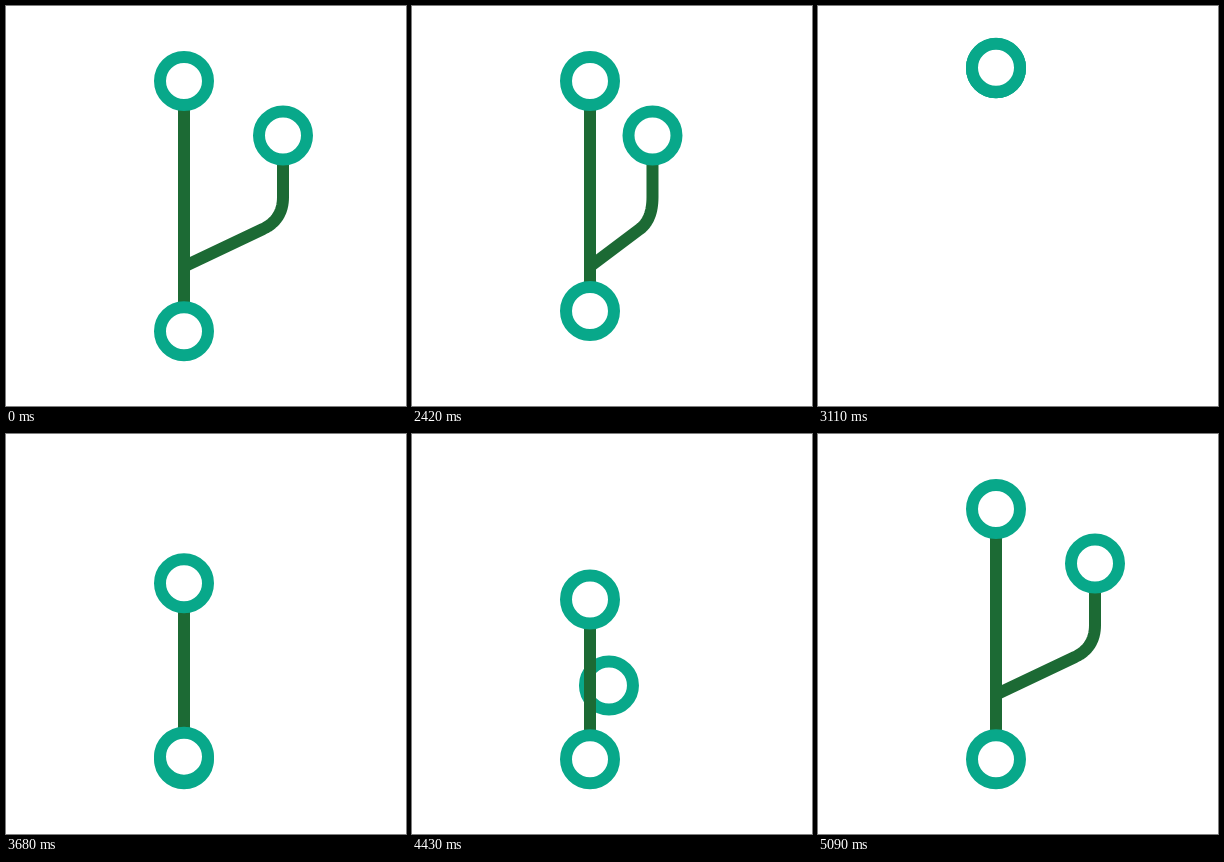
An HTML page with a canvas for the animation above (5120 ms loop, 400x400 px).

```html
<!DOCTYPE html>
<html lang="en">
<head>
<meta charset="utf-8">
<title>Fork</title>
<style>
html, body { margin: 0; width: 100%; height: 100%; overflow: hidden; background: #fff; }
canvas { display: block; width: 400px; height: 400px; }
</style>
</head>
<body>
<canvas id="stage" width="400" height="400"></canvas>
<script>
const ctx = document.getElementById('stage').getContext('2d');
const LOOP = 5120;
const RING = '#08a88a', LINE = '#1c6a34';
const X = 178, TOP = 75, BOTTOM = 325.3, PEAK = 57;
const SIDE = { x: 277, y: 129.5 };

const clamp = v => Math.max(0, Math.min(1, v));
const mix = (a, b, p) => a + (b - a) * p;
const span = (t, start, length) => clamp((t - start) / length);
const cubic = p => p < 0.5 ? 4 * p ** 3 : 1 - 4 * (1 - p) ** 3;

// cubic-bezier(.4, 0, .2, 1)
function swift(x) {
  let lo = 0, hi = 1;
  for (let i = 0; i < 24; i++) {
    const s = (lo + hi) / 2, r = 1 - s;
    if (1.2 * r * r * s + 0.6 * r * s * s + s ** 3 < x) lo = s; else hi = s;
  }
  return lo * lo * (3 - 2 * lo);
}

// Branch route: up the trunk, along the diagonal, round the bend, up
function makeRoute() {
  const a = { x: 257, y: 223 }, corner = { x: SIDE.x, y: 213.5 }, b = { x: SIDE.x, y: 191 };
  const pts = [{ x: X, y: BOTTOM }, { x: X, y: 260.5 }];
  for (let i = 0; i <= 16; i++) {
    const s = i / 16, r = 1 - s;
    const at = k => r * r * a[k] + 2 * r * s * corner[k] + s * s * b[k];
    pts.push({ x: at('x'), y: at('y') });
  }
  pts.push(SIDE);
  return pts;
}
const route = makeRoute();
const gap = (a, b) => Math.hypot(b.x - a.x, b.y - a.y);
const total = route.reduce((sum, p, i) => i ? sum + gap(route[i - 1], p) : 0, 0);

// The first part of the route, up to the given share of its length
function cut(share) {
  let left = total * share;
  const out = [route[0]];
  for (let i = 1; i < route.length; i++) {
    const a = route[i - 1], b = route[i], d = gap(a, b);
    if (left < d) {
      out.push({ x: mix(a.x, b.x, left / d), y: mix(a.y, b.y, left / d) });
      break;
    }
    out.push(b);
    left -= d;
  }
  return out;
}

function pose(t) {
  if (t < 3544) {
    const fold = cubic(span(t, 2023, 881));
    const lift = (TOP - PEAK) * (1 - (1 - span(t, 2962, 307)) ** 2);
    const top = TOP - lift;
    const raised = mix(BOTTOM, TOP, cubic(span(t, 2132, 1059))) - lift;
    const bottom = mix(raised, BOTTOM, swift(span(t, 3262, 482)));
    const line = route.map(p => ({ x: mix(p.x, X, fold), y: p.y }));
    const side = { x: mix(SIDE.x, X, fold), y: t > 3200 ? bottom : Math.min(SIDE.y, bottom) };
    return { top, bottom, side, line: t < 2962 ? line : [] };
  }
  const drop = mix(PEAK, BOTTOM, swift(span(t, 3544, 470)));
  const top = mix(drop, TOP, swift(span(t, 4006, 1030)));
  const bottom = mix(PEAK, BOTTOM, swift(span(t, 3262, 482)));
  const line = cut(swift(span(t, 4162, 930)));
  return { top, bottom, side: line[line.length - 1], line };
}

function stroke(pts) {
  if (pts.length < 2) return;
  ctx.beginPath();
  pts.forEach(p => ctx.lineTo(p.x, p.y));
  ctx.strokeStyle = LINE;
  ctx.lineWidth = 12;
  ctx.lineJoin = 'round';
  ctx.stroke();
}

function ring(x, y) {
  ctx.beginPath();
  ctx.arc(x, y, 24, 0, Math.PI * 2);
  ctx.fillStyle = '#fff';
  ctx.fill();
  ctx.strokeStyle = RING;
  ctx.lineWidth = 12;
  ctx.stroke();
}

function draw(t) {
  const { top, bottom, side, line } = pose(t);
  ctx.fillStyle = '#fff';
  ctx.fillRect(0, 0, 400, 400);

  ctx.save();
  ctx.beginPath();
  ctx.rect(0, 0, 400, bottom);
  ctx.clip();
  stroke(line);
  ctx.restore();

  ring(side.x, side.y);
  stroke([{ x: X, y: top }, { x: X, y: bottom }]);
  ring(X, bottom);
  ring(X, top);
}

const begin = performance.now();
function tick() {
  draw((performance.now() - begin) % LOOP);
  requestAnimationFrame(tick);
}
tick();
</script>
</body>
</html>
```
